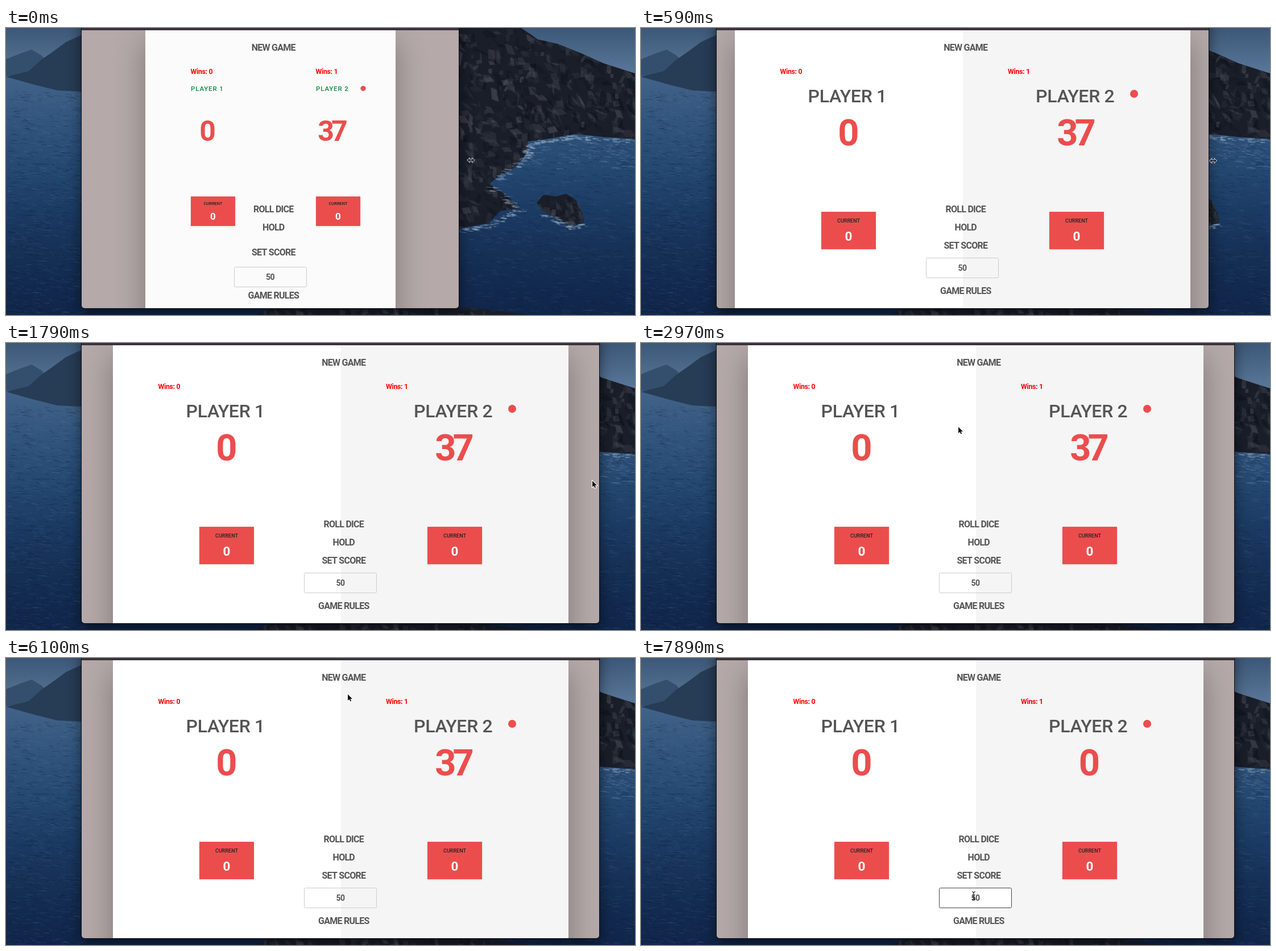
These frames come from a looping animation (1106 by 506 pixels, 8 s). An HTML page with a canvas:

```html
<!DOCTYPE html>
<html lang="en">
<head>
<meta charset="utf-8">
<title>Dice game</title>
<style>
  html, body { margin: 0; width: 100%; height: 100%; overflow: hidden; background: #14305a; }
  canvas { display: block; width: 1106px; height: 506px; }
</style>
</head>
<body>
<canvas id="stage" width="1106" height="506"></canvas>
<script>
const W = 1106, H = 506, LOOP = 8000, LEFT = 133, BOTTOM = 494;
const RED = '#eb4d4d', GREY = '#555';
const canvas = document.getElementById('stage');
let ctx = canvas.getContext('2d');

// Layouts: offsets are measured from the left edge of each player's half
const NARROW = {
  width: 440, name: [80, 106.5, 11.5, 0.9, '#0a8a42'], dot: [163, 106.5, 4.6],
  score: [109.5, 181, 50, -5], box: [79.5, 297, 78, 52], label: [309.5, 7.5], current: [331.5, 17],
  setScore: 394.5, input: 421, rules: 470.5
};
const MID = {
  width: 681, name: [115, 114.5, 24, 0.4, '#111'], dot: [253, 114.5, 7],
  score: [169.5, 173.5, 65, -6], box: [134, 315, 72, 66], label: [329.5, 9], current: [357.5, 22.5],
  setScore: 382.5, input: 405, rules: 462.5
};
const WIDE = {
  ...MID, width: 801, name: [128.5, 119.5, 32, -0.3, GREY], dot: [301.5, 116, 7],
  score: [200, 183.5, 65, -6], box: [152, 324, 96, 66], label: [339.5, 9], current: [367.5, 22.5]
};

// Time, right edge of the window, layout
const SIZES = [
  [0, 796, NARROW], [140, 861, MID], [290, 927, MID], [440, 965, MID], [590, 998, WIDE],
  [740, 1024, WIDE], [890, 1047, WIDE], [1040, 1046, WIDE], [1190, 1043, WIDE]
];

// Time, x, y, pointer shape
const POINTER = [
  [0, 817.5, 233, resize], [140, 872, 233, resize], [290, 935.5, 233, resize], [440, 975, 233, resize],
  [590, 1006, 234, resize], [740, 1029, 235.5, resize], [890, 1052, 235, resize],
  [1040, 1046, 235, resize], [1190, 1043, 235, resize],
  [1790, 1030, 242, arrow], [1940, 960, 280, arrow], [2090, 860, 318, arrow], [2240, 755, 332, arrow],
  [2390, 680, 300, arrow], [2540, 620, 220, arrow], [2690, 578, 135, arrow], [2820, 560, 97, arrow],
  [2970, 557, 147, arrow], [3120, 575, 80, arrow], [3270, 602, 190, arrow], [3420, 602, 316, hand],
  [3570, 600, 350, hand], [3720, 598, 384, hand], [3870, 594, 460, hand], [4010, 588, 420, arrow],
  [4460, 588, 419, arrow], [4910, 588, 419.5, arrow], [5060, 590, 402, arrow], [5210, 597, 275, arrow],
  [5360, 602, 215, arrow], [5510, 604, 165, arrow], [5660, 604, 125, arrow], [5800, 603, 98, arrow],
  [5950, 602, 82, arrow], [6100, 600, 63, arrow], [6250, 598, 48, arrow], [6400, 597, 37, hand],
  [6550, 596, 35, hand], [6700, 595, 35, hand],
  [7150, 594, 66, arrow], [7300, 592, 160, arrow], [7450, 590, 275, arrow], [7600, 588, 365, arrow],
  [7750, 586, 408, beam], [7890, 585, 418, beam]
];
const RESET = 7000, FOCUS = 7890;

const stepAt = (steps, t) => steps.findLast(s => s[0] <= t);

function seeded(seed) {
  return () => (seed = (seed * 16807) % 2147483647) / 2147483647;
}

function poly(color, points, outline, lineWidth = 2) {
  ctx.beginPath();
  for (let i = 0; i < points.length; i += 2) ctx.lineTo(points[i], points[i + 1]);
  ctx.closePath();
  if (outline) {
    ctx.strokeStyle = outline;
    ctx.lineWidth = lineWidth;
    ctx.stroke();
  }
  ctx.fillStyle = color;
  ctx.fill();
}

function gradient(y0, y1, ...colors) {
  const g = ctx.createLinearGradient(0, y0, 0, y1);
  colors.forEach((c, i) => g.addColorStop(i / (colors.length - 1), c));
  return g;
}

// y is the middle of the capital letters
function text(s, x, y, size, color, { spacing = 0, weight = 700, align = 'center' } = {}) {
  ctx.font = `${weight} ${size}px Roboto, sans-serif`;
  ctx.letterSpacing = spacing + 'px';
  ctx.textAlign = align;
  ctx.fillStyle = color;
  ctx.fillText(s, x, y + size * 0.355);
}

function streaks(random, count, color, x0, x1, y0, y1) {
  ctx.strokeStyle = color;
  ctx.lineWidth = 1;
  ctx.beginPath();
  for (let i = 0; i < count; i++) {
    const x = x0 + random() * (x1 - x0), y = y0 + random() * (y1 - y0), w = 3 + random() * 12;
    ctx.moveTo(x, y);
    ctx.quadraticCurveTo(x + w / 2, y - 1.5, x + w, y + random() * 2);
  }
  ctx.stroke();
}

// Dark mass with irregular slivers of light and shade running down the slope
function rock(random, points, count) {
  ctx.save();
  poly('#1a1e29', points);
  ctx.clip();
  const xs = points.filter((_, i) => i % 2 === 0), ys = points.filter((_, i) => i % 2);
  const x0 = Math.min(...xs), y0 = Math.min(...ys);
  const w = Math.max(...xs) - x0, h = Math.max(...ys) - y0;
  const tones = ['#3a3f4b', '#0d111a', '#2b303b', '#141822', '#4a4d56'];
  for (let i = 0; i < count; i++) {
    const x = x0 + random() * w, y = y0 + random() * h;
    const angle = 0.2 + random() * 1.3, length = 6 + random() * 24, breadth = 1 + random() * 5;
    const dx = Math.cos(angle) * length, dy = Math.sin(angle) * length;
    ctx.globalAlpha = 0.25 + random() * 0.35;
    poly(tones[i % tones.length], [x, y, x + dx * 0.4 + breadth, y + dy * 0.4 - breadth, x + dx, y + dy,
      x + dx * 0.5 - breadth, y + dy * 0.6 + breadth]);
  }
  ctx.restore();
}

// Broken white water scattered along a shoreline
function foam(random, points, count) {
  const segments = points.length / 2 - 1;
  ctx.fillStyle = 'rgba(165,185,205,.4)';
  for (let i = 0; i < count; i++) {
    const k = Math.floor(random() * segments) * 2, u = random();
    const x = points[k] + (points[k + 2] - points[k]) * u + random() * 14 - 4;
    const y = points[k + 1] + (points[k + 3] - points[k + 1]) * u + random() * 7 - 1;
    ctx.beginPath();
    ctx.ellipse(x, y, 1 + random() * 6, 0.4 + random() * 0.9, 0.1, 0, Math.PI * 2);
    ctx.fill();
  }
}

function paintCoast() {
  const random = seeded(77);
  ctx.fillStyle = gradient(0, 90, '#3c5878', '#5d7b9d');
  ctx.fillRect(0, 0, W, H);
  poly('#344f6e', [0, 55, 25, 45, 45, 38, 62, 48, 75, 62, 75, 90, 0, 90]);
  ctx.fillStyle = gradient(84, H, '#426389', '#31547c', '#23476f', '#1a3860', '#142d52', '#10254a');
  ctx.fillRect(0, 84, W, H);
  poly('#273c55', [0, 86, 40, 76, 62, 56, 85, 40, 105, 25, 133, 12, 200, 0, 200, 116, 90, 110, 50, 100]);
  for (const [x0, x1, y0] of [[0, LEFT, 112], [800, W, 200]]) {
    streaks(random, 480, 'rgba(110,145,180,.15)', x0, x1, y0, H);
    streaks(random, 480, 'rgba(8,22,46,.25)', x0, x1, y0, H);
  }

  rock(random, [780, 0, 906, 0, 935, 20, 970, 28, 1010, 44, 1050, 62, 1106, 80, 1106, 196, 1050, 192,
    1000, 187, 950, 196, 918, 200, 915, 222, 895, 246, 865, 262, 850, 275, 880, 295, 903, 318,
    870, 322, 848, 344, 780, 356], 900);
  rock(random, [933, 308, 945, 294, 968, 297, 985, 292, 1003, 304, 1015, 330, 1016, 345, 990, 348,
    962, 332, 942, 322], 70);
  rock(random, [440, 506, 460, 496, 560, 492, 700, 495, 820, 493, 920, 506], 60);
  foam(random, [1106, 198, 1000, 190, 920, 202, 915, 224, 865, 264], 170);
  foam(random, [850, 277, 903, 318, 848, 346, 796, 356], 90);
  foam(random, [938, 322, 962, 336, 990, 350, 1018, 346], 60);
  streaks(random, 90, 'rgba(150,175,200,.28)', 915, W, 200, 250);
}

function arrow(x, y) {
  poly('#111', [x + 1, y + 1, x + 1, y + 12, x + 3.6, y + 9.7, x + 5.4, y + 13.6, x + 7.2, y + 12.8,
    x + 5.5, y + 9, x + 9, y + 9], '#fff');
}

function resize(x, y) {
  poly('#1a1f2a', [x - 6, y, x - 2.5, y - 3.5, x - 2.5, y - 1, x + 2.5, y - 1, x + 2.5, y - 3.5, x + 6, y,
    x + 2.5, y + 3.5, x + 2.5, y + 1, x - 2.5, y + 1, x - 2.5, y + 3.5], '#e8e8e8', 1.4);
}

function hand(x, y) {
  poly('#fff', [x - 1, y - 1, x + 1, y - 1, x + 1, y + 4, x + 7, y + 6, x + 7, y + 10, x + 5, y + 14,
    x - 1, y + 14, x - 5, y + 8, x - 4, y + 6, x - 1, y + 8], '#111');
}

function beam(x, y) {
  ctx.strokeStyle = '#222';
  ctx.lineWidth = 1.2;
  ctx.beginPath();
  ctx.moveTo(x - 3, y - 6);
  ctx.quadraticCurveTo(x, y - 6, x, y - 3);
  ctx.quadraticCurveTo(x, y - 6, x + 3, y - 6);
  ctx.moveTo(x, y - 4);
  ctx.lineTo(x, y + 7);
  ctx.moveTo(x - 3, y + 8);
  ctx.quadraticCurveTo(x, y + 8, x, y + 5);
  ctx.quadraticCurveTo(x, y + 8, x + 3, y + 8);
  ctx.moveTo(x - 2, y + 3);
  ctx.lineTo(x + 2, y + 3);
  ctx.stroke();
}

function drawPlayer(x, number, wins, score, layout) {
  const { name, box, label, current } = layout;
  text('Wins: ' + wins, x + 79.5, 76.5, 12.3, '#f00', { spacing: -0.3, align: 'left' });
  text('PLAYER ' + number, x + name[0], name[1], name[2], name[4],
    { spacing: name[3], weight: 500, align: 'left' });
  const [sx, sy, size, spacing] = layout.score;
  text(score, x + sx + spacing / 2, sy, size, RED, { spacing });

  const boxX = Math.round(x + box[0]), middle = boxX + box[2] / 2;
  ctx.save();
  ctx.shadowColor = 'rgba(0,0,0,.12)';
  ctx.shadowBlur = 3;
  ctx.shadowOffsetY = 1;
  ctx.fillStyle = RED;
  ctx.fillRect(boxX, box[1], box[2], box[3]);
  ctx.restore();
  text('CURRENT', middle, label[0], label[1], '#222', { weight: 500 });
  text('0', middle, current[0], current[1], '#fff');
}

function drawPage(t, right, layout, pointer) {
  const half = layout.width / 2, left = Math.round((LEFT + right) / 2 - half), center = left + half;

  ctx.save();
  ctx.shadowColor = 'rgba(0,0,0,.3)';
  ctx.shadowBlur = 50;
  ctx.shadowOffsetY = 20;
  ctx.fillStyle = layout === NARROW ? '#fbfbfb' : '#fff';
  ctx.fillRect(left, 4, layout.width, 640);
  ctx.restore();
  if (layout !== NARROW) {
    ctx.fillStyle = '#f5f5f5';
    ctx.fillRect(Math.round(center), 4, Math.floor(half), 640);
  }

  drawPlayer(left, 1, 0, '0', layout);
  drawPlayer(center, 2, 1, t < RESET ? '37' : '0', layout);
  const [dx, dy, radius] = layout.dot;
  ctx.fillStyle = RED;
  ctx.beginPath();
  ctx.arc(center + dx, dy, radius, 0, Math.PI * 2);
  ctx.fill();

  const buttons = [['NEW GAME', 34.5], ['ROLL DICE', 319], ['HOLD', 351],
    ['SET SCORE', layout.setScore + 0.5], ['GAME RULES', layout.rules + 0.5]];
  for (const [label, y] of buttons) {
    const hover = pointer[3] === hand && Math.abs(pointer[2] - y) < 12;
    text(label, center + 5.3, y, 16, GREY, { spacing: -0.75, weight: hover ? 900 : 700 });
  }

  const focused = t >= FOCUS;
  ctx.beginPath();
  ctx.roundRect(Math.floor(center) - 63.5, layout.input + 0.5, 127, 35, 2);
  if (focused) {
    ctx.fillStyle = '#fff';
    ctx.fill();
  }
  ctx.strokeStyle = focused ? '#444' : '#ccc';
  ctx.lineWidth = 1;
  ctx.stroke();
  text('50', center - 0.5, layout.input + 18.5, 14, GREY, { spacing: -0.6 });
}

function drawWindow(t, pointer) {
  const [, right, layout] = stepAt(SIZES, t);
  ctx.save();
  ctx.beginPath();
  ctx.roundRect(LEFT, -20, right - LEFT, BOTTOM + 20, 5);
  ctx.shadowColor = 'rgba(0,0,0,.55)';
  ctx.shadowBlur = 24;
  ctx.shadowOffsetY = 8;
  ctx.fillStyle = '#b5a9a9';
  ctx.fill();
  ctx.shadowColor = 'transparent';
  ctx.strokeStyle = '#0b0d14';
  ctx.lineWidth = 2;
  ctx.stroke();
  ctx.clip();
  ctx.fillRect(LEFT, 0, right - LEFT, BOTTOM);
  drawPage(t, right, layout, pointer);
  ctx.fillStyle = '#39323c';
  ctx.fillRect(LEFT, 0, right - LEFT, 4);
  ctx.restore();
}

const screen = ctx;
const coast = document.createElement('canvas');
coast.width = W;
coast.height = H;
ctx = coast.getContext('2d');
paintCoast();
ctx = screen;

function draw() {
  const t = performance.now() % LOOP;
  const pointer = stepAt(POINTER, t);
  ctx.drawImage(coast, 0, 0);
  drawWindow(t, pointer);
  pointer[3](pointer[1], pointer[2]);
  requestAnimationFrame(draw);
}
draw();
</script>
</body>
</html>
```
